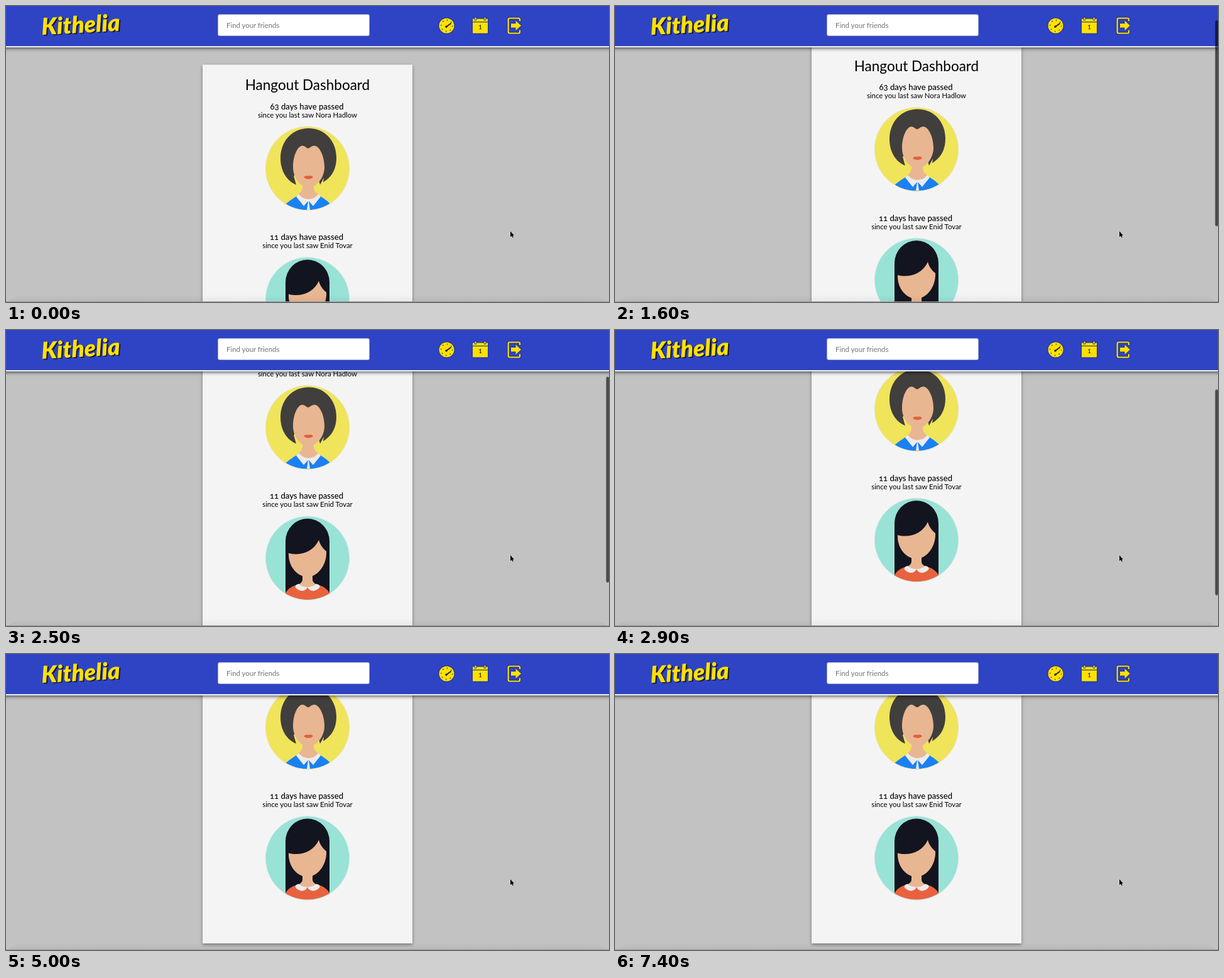
Write an HTML page that moves like this. It is 960 px wide and 472 px high and loops after 7.5 s.

```html
<!DOCTYPE html>
<html lang="en">
<head>
<meta charset="utf-8">
<title>Hangout Dashboard</title>
<style>
@property --scroll { syntax: "<number>"; inherits: true; initial-value: 0; }
html, body { margin: 0; width: 100%; height: 100%; overflow: hidden; background: #c2c2c2; }
svg { display: block; width: 960px; height: 472px; font-family: Raleway, Lato, "Open Sans", sans-serif; }
#stage { animation: scroll 7500ms infinite; }
#page { transform: translateY(calc(var(--scroll) * -1px)); text-anchor: middle; font-variant-numeric: oldstyle-nums; }
#thumb { transform: translateY(calc(var(--scroll) * .705px)); animation: thumb 7500ms linear infinite; }
#card { filter: drop-shadow(0 2px 2.5px rgba(0,0,0,.42)); }
#bar { filter: drop-shadow(0 1px 3px rgba(0,0,0,.75)); }
#icons { filter: drop-shadow(0 0 1px rgba(0,0,0,.6)); }
.title { font-size: 22.5px; }
.days { font-size: 13.1px; font-weight: 500; }
.since { font-size: 11.4px; }
.logo { font: italic 900 37px Lato, "Open Sans", sans-serif; }
/* Scrolls in 100 ms ticks, easing out at the end of the page */
@keyframes scroll {
  0% { --scroll: 0; animation-timing-function: step-end; }
  14.66% { --scroll: 0; animation-timing-function: steps(5); }
  21.33% { --scroll: 30.5; animation-timing-function: steps(6); }
  29.33% { --scroll: 82; animation-timing-function: steps(7); }
  38.66% { --scroll: 132.5; animation-timing-function: steps(1); }
  39.99% { --scroll: 138; animation-timing-function: steps(1); }
  41.33% { --scroll: 140.8; animation-timing-function: steps(1); }
  42.66%, 100% { --scroll: 142; }
}
@keyframes thumb {
  0%, 14.65% { opacity: 0; }
  14.66%, 48% { opacity: 1; }
  52%, 100% { opacity: 0; }
}
</style>
</head>
<body>
<svg id="stage" viewBox="0 0 960 472">
  <defs>
    <clipPath id="round"><circle r="66.5"/></clipPath>
    <linearGradient id="fade" x2="0" y2="1">
      <stop offset="0" stop-opacity="0"/><stop offset="1" stop-opacity=".05"/>
    </linearGradient>
  </defs>
  <rect width="960" height="472" fill="#c2c2c2"/>

  <g id="page">
    <rect id="card" x="313" y="93.5" width="334" height="510" fill="#f4f4f4"/>
    <text class="title" x="480" y="134">Hangout Dashboard</text>

    <text class="days" x="479" y="164.5">63 days have passed</text>
    <text class="since" x="480" y="177.5">since you last saw Nora Hadlow</text>
    <g transform="translate(480 259)">
      <g clip-path="url(#round)">
        <circle r="67" fill="#f0e45a"/>
        <path fill="#403f3d" d="M-18 26C-33 20 -43 4 -43 -16C-43 -44 -24 -64 2 -64C27 -64 46 -44 46 -17C46 2 38 14 25 22L26 15L20 26L14 5H-13L-22 12Z"/>
        <path fill="#1a80f5" d="M-36 70V58C-28 51 -22 47 -15 43H18C25 47 31 51 38 58V70Z"/>
        <path fill="#e9b692" d="M-8 20V29C-8 36 -12 40 -16 42L1 53L19 42C14 40 10 36 10 29V20Z"/>
        <path fill="#ececec" d="M-14 41C-9 47 -3 49 1 49C7 49 13 47 17 41L21 45L9 60L2 52L4 66H-1L1 52L-6 60L-18 45Z"/>
        <path fill="#e9b692" d="M1 -32C4 -32 7 -37 12 -36C19 -35 27 -20 27 -2C27 15 14 30 2 31C-11 30 -23 15 -23 -2C-23 -20 -16 -35 -9 -36C-5 -37 -2 -32 1 -32Z"/>
        <path fill="#e3603c" d="M-6 14C-3 11 -1 11 1 12C4 11 7 11 9 14C6 18 -3 18 -6 14Z"/>
      </g>
      <circle r="66.7" fill="none" stroke="#e9e4b0"/>
    </g>

    <text class="days" x="478.5" y="373">11 days have passed</text>
    <text class="since" x="480" y="386">since you last saw Enid Tovar</text>
    <g transform="translate(480 467.5)">
      <g clip-path="url(#round)">
        <circle r="67" fill="#99e2d6"/>
        <path fill="#12141f" d="M-35 58V-27A35 36 0 0 1 35 -27V58Z"/>
        <path fill="#e9623f" d="M-36 70V57C-30 47 -22 43 -12 42H12C23 43 31 48 36 57V70Z"/>
        <path fill="#e9b692" d="M-8 22V34C-8 38 -11 40 -14 42C-9 48 -4 48 0 46C4 48 9 48 14 42C11 40 8 38 8 34V22Z"/>
        <path fill="#ececec" d="M-14 41C-10 45 -5 46 0 46C5 46 10 45 14 41C18 42 21 44 19 47C13 54 3 54 0 46C-3 54 -13 54 -19 47C-20 44 -18 42 -14 41Z"/>
        <path fill="#e9b692" d="M-30 -8C-12 -3 10 -10 18 -29C20 -21 25 -15 30 -11C31 12 15 30 0 30C-15 30 -31 14 -30 -8Z"/>
      </g>
      <circle r="66.7" fill="none" stroke="#cfe6e1"/>
    </g>
  </g>

  <path fill="url(#fade)" d="M20 460H940L958 472H2Z"/>
  <rect y="471" width="960" height="1" fill="#989898"/>

  <g id="bar">
    <rect x="-9" y="-9" width="978" height="75" fill="#f3f3fa"/>
    <rect width="960" height="64" fill="#2e44c4"/>
  </g>
  <g class="logo" transform="rotate(-3 57 46)">
    <text x="59" y="47.5" fill="#14142a">Kithelia</text>
    <text x="57" y="46" fill="#ffe100">Kithelia</text>
  </g>

  <rect x="337.500" y="13.500" width="241" height="34" rx="2.500" fill="#fff" stroke="#a3abd6"/>
  <text class="since" x="351" y="35" fill="#757575">Find your friends</text>

  <g id="icons" fill="#ffe100">
    <circle cx="701.5" cy="31.5" r="12"/>
    <circle cx="701.5" cy="31.5" r="9" fill="none" stroke="#3a3a40" stroke-width="1.6" stroke-dasharray="1.5 5.57"/>
    <path d="M701 33L708 28" stroke="#22222c" stroke-width="2" stroke-linecap="round"/>
    <circle cx="701" cy="33" r="1.8" fill="#22222c"/>

    <path d="M743 20.5H767V25H743ZM743 26H767V42.5Q767 43.5 766 43.5H744Q743 43.5 743 42.5Z"/>
    <path d="M747.5 18.5V23M762.5 18.5V23" stroke="#2e44c4" stroke-width="3.5"/>
    <path d="M747.5 18.5V22M762.5 18.5V22" stroke="#ffe100" stroke-width="1.8"/>
    <text x="755" y="37" text-anchor="middle" font-size="9" font-weight="700" fill="#2b2b35">1</text>

    <path d="M818 24V21.500Q818 19.500 816 19.500H802Q799.700 19.500 799.700 21.800V41Q799.700 43.500 802 43.500H816Q818 43.500 818 41.500V38.500" fill="none" stroke="#ffe100" stroke-width="2.2"/>
    <path d="M804 28H811.500V23.500L820 31.200L811.500 39V34.500H804Z"/>
  </g>

  <path d="M803 359V368.500L805.100 366.600L806.600 369.500L808 368.800L806.700 366H809Z" stroke="#fff" stroke-width="1" stroke-opacity=".7" paint-order="stroke"/>
  <rect id="thumb" x="955.5" y="1.5" width="4.5" height="328" rx="2" fill="#000" fill-opacity=".62"/>
</svg>
</body>
</html>
```
